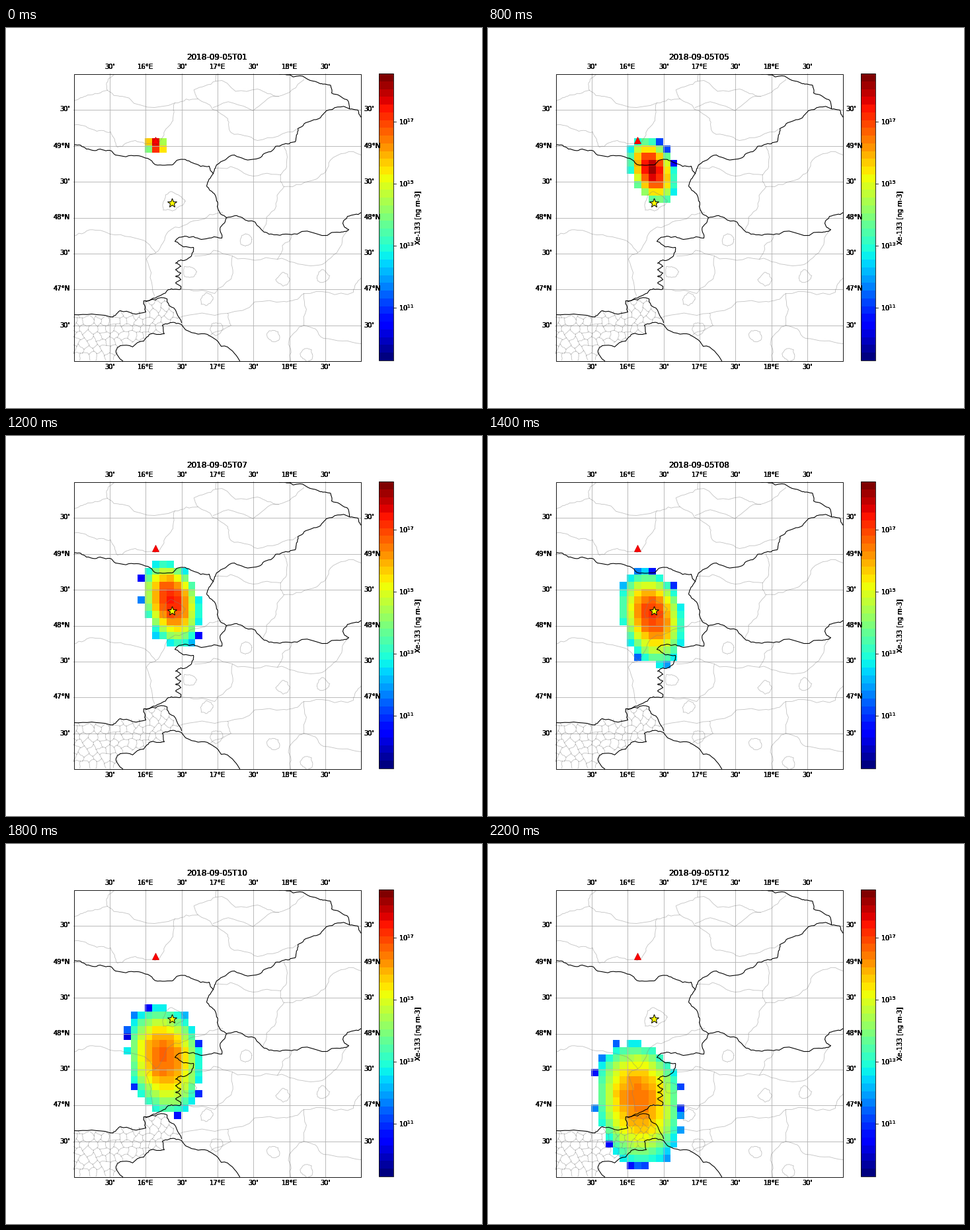
These frames come from a looping animation (720 px wide and 576 px high, 2400 ms). A matplotlib script:

```python
import numpy as np
import matplotlib.pyplot as plt
from matplotlib.animation import FuncAnimation
from matplotlib.patches import Polygon, Rectangle

rng = np.random.default_rng(7)
LEFT, TOP, SIDE = 101.6, 69.12, 434.8
RIGHT, BOTTOM = LEFT + SIDE, TOP + SIDE
DEG = SIDE / 4                    # pixels per degree
CELL = DEG / 10
BANDS = 37                        # colour steps of the scale
RIM = 0.4                         # level at the nominal edge of the cloud
COLS, ROWS = np.arange(-7, 10), np.arange(-1, 29)


def plume(hour):
    """Level per cell: a cloud that drifts south, swings east and spreads."""
    s = hour - 1
    peak = 0.9 + 0.125 * np.cos(np.pi * s / 11)
    cx = 1 + 2.1 * np.sin(np.pi * s / 11)
    cy = -0.6 + 0.3 * s + 0.13 * s ** 2
    width = 1.5 + 0.37 * s
    height = 1.2 + 6.8 * (s / 11) ** 0.75
    shear = 0.3 - 0.022 * s

    i, j = np.meshgrid(COLS, ROWS)
    dy = j - cy
    v = dy / (height * np.where(dy < 0, 0.9, 1.12))
    r = np.hypot((i - cx - shear * dy) / width, v)
    level = peak - (peak - RIM) * r ** (1.6 + 0.05 * s)

    # a few thin, dark cells just outside the rim
    noise = np.random.default_rng(hour)
    thin = (r > 1.06) & (r < 1.17) & (noise.random(r.shape) < 0.3)
    level = np.where(thin, noise.uniform(0.1, 0.35, r.shape), level)
    level = np.clip(np.floor(level * BANDS), 0, BANDS - 1) / (BANDS - 1)
    return np.ma.array(level, mask=(r > 1.06) & ~thin)


fig = plt.figure(figsize=(10, 8), dpi=72, facecolor="white")
ax = fig.add_axes([0, 0, 1, 1])
ax.set(xlim=(0, 720), ylim=(576, 0))
ax.axis("off")


def pixel(v):
    return np.round(v) + 0.5


window = Rectangle((pixel(LEFT), pixel(TOP)), pixel(RIGHT) - pixel(LEFT),
                   pixel(BOTTOM) - pixel(TOP), fill=False, ec="black",
                   lw=0.9, zorder=6)
ax.add_patch(window)


def label(x, y, s, size=10, **kw):
    # stacked copies give the heavy edges of the lettering
    kw = {"ha": "center", "va": "center", **kw}
    return [ax.text(x, y, s, fontsize=size, family="DejaVu Sans", **kw)
            for _ in range(6)]


def rough(points, rounds=3):
    """Coastline-like polyline by midpoint displacement."""
    p = np.array(points, float) + 0.5
    for _ in range(rounds):
        d = np.diff(p, axis=0)
        push = np.clip(rng.normal(0, 0.09, (len(d), 1)), -0.15, 0.15)
        mid = (p[1:] + p[:-1]) / 2 + push * d[:, ::-1] * [-1, 1]
        out = np.empty((2 * len(p) - 1, 2))
        out[::2], out[1::2] = p, mid
        p = out
    return p


def path(points, color="black", lw=1.1, alpha=1, z=4, clip=window):
    line, = ax.plot(*rough(points).T, color=color, lw=lw, alpha=alpha, zorder=z,
                    solid_joinstyle="round")
    line.set_clip_path(clip)


def district(*points, clip=window):
    path(points, "gray", 0.9, 0.45, 3, clip)


def town(x, y, r):
    a = np.linspace(0, 2 * np.pi, 9)[:, None]
    k = rng.uniform(0.75, 1.15, a.shape)
    k[-1] = k[0]
    district(*([x, y] + r * k * np.hstack([np.cos(a), np.sin(a)])))


mesh = ax.pcolormesh(LEFT + DEG + CELL * np.append(COLS, COLS[-1] + 1),
                     TOP + DEG + CELL * np.append(ROWS, ROWS[-1] + 1),
                     plume(1), cmap="jet", vmin=0, vmax=1, zorder=1)

# graticule and its labels
for k in range(1, 8):
    x, y = pixel(LEFT + k * DEG / 2), pixel(TOP + k * DEG / 2)
    ax.plot([x, x], [TOP, BOTTOM], color="#b4b4b4", lw=0.9, zorder=2)
    ax.plot([LEFT, RIGHT], [y, y], color="#b4b4b4", lw=0.9, zorder=2)
    lon = "30'" if k % 2 else f"{15 + k // 2}°E"
    lat = "30'" if k % 2 else f"{50 - k // 2}°N"
    label(x, 58.5, lon)
    label(x, 514, lon)
    label(97, y, lat, ha="right")
    label(541.5, y, lat, ha="left")

# national borders, all hung on a few junctions
north, west_end, bend = (519, 122), (313, 220), (333, 287)
alps = [(264, 395), (245, 396), (222, 409), (208, 413), (211, 430), (172, 428),
        (156, 437), (102, 434)]
mur = [(208, 413), (243, 410), (246, 420), (265, 446)]
sava = [(176, 504), (166, 488), (172, 481), (208, 474), (216, 464), (239, 463),
        (236, 450), (250, 446), (265, 449), (300, 463), (325, 482), (353, 504)]
zigzag = [(260 + 4 * (-1) ** n, y) for n, y in enumerate(range(351, 396, 5))]

path([(404, 69), (444, 72), (475, 84), (490, 86), (492, 98), (515, 108), north])
path([(537, 135), (532, 124), north, (484, 125), (462, 140), (441, 152),
      (437, 172), (418, 176), (400, 187), (378, 198), (345, 192), (318, 207),
      west_end])
path([(102, 177), (121, 183), (145, 184), (165, 192), (197, 193), (222, 204),
      (251, 207), (258, 200), (282, 204), (307, 209), west_end])
path([west_end, (303, 239), (314, 250), (320, 273), bend, (325, 300), (326, 318),
      (295, 320), (270, 315), (255, 323), (283, 332), (280, 345)] + zigzag + alps)
path([bend, (357, 287), (390, 309), (405, 313), (440, 312), (500, 309),
      (518, 305), (509, 296), (516, 285), (537, 279)])
path(mur)
path(sava)

# districts
district((102, 111), (123, 101), (153, 94), (155, 76), (163, 70))
district((153, 94), (175, 103), (255, 113), (252, 140), (240, 155), (225, 176),
         (195, 170), (168, 180), (158, 157), (130, 153), (102, 147))
district((255, 113), (290, 107), (284, 93), (317, 80), (318, 69))
district((290, 107), (335, 137), (340, 158), (380, 170), (440, 152))
district((317, 80), (380, 92), (412, 103), (450, 78))
district((313, 120), (373, 125), (412, 103))
district((316, 212), (360, 220), (415, 222), (420, 240), (408, 270), (388, 307))
district((420, 240), (470, 228), (490, 200), (537, 192))
district((420, 178), (425, 195), (415, 222))
district((102, 315), (135, 306), (195, 318), (226, 340), (212, 350), (224, 405))
district((226, 340), (245, 308), (290, 291), (327, 279))
district((285, 345), (342, 345), (340, 380), (315, 402), (264, 395))
district((342, 345), (410, 350), (432, 313))
district((410, 350), (460, 360), (500, 340), (515, 305))
district((258, 440), (335, 432), (420, 414), (450, 402), (525, 400), (537, 378))
district((335, 432), (340, 450), (305, 467))
district((450, 402), (450, 450), (480, 470), (537, 478))
district((450, 450), (428, 470), (430, 504))
town(251, 262, 17)
for x, y in [(277, 369), (418, 381), (478, 375), (302, 411), (405, 466),
             (455, 494), (362, 320), (317, 455)]:
    town(x, y, 10)

# dense municipalities: a jittered honeycomb cut to one country
region = Polygon(alps[:2:-1] + mur[1:] + sava[8::-1] + [(102, 504)],
                 fc="none", ec="none")
ax.add_patch(region)
row, col = np.mgrid[:10, :26]
tilt = np.where((row + col) % 2, -2, 2)
comb = np.dstack([98 + 6.5 * col, 405 + 11 * row + tilt])
comb = comb + rng.uniform(-2.7, 2.7, comb.shape)
for r, c in np.ndindex(9, 25):
    district(comb[r, c], comb[r, c + 1], clip=region)
    if (r + c) % 2 == 0:
        district(comb[r, c], comb[r + 1, c], clip=region)

# release point and station
ax.plot(226.2, 169.5, "^", ms=10, mfc="red", mec="#d00000", mew=0.8, zorder=5)
ax.plot(251.3, 264.5, "*", ms=14, mfc="yellow", mec="black", mew=1, zorder=5)

# colour bar
bar_x, bar_w = 564.3, SIDE / 20
ax.pcolormesh([bar_x, bar_x + bar_w], np.linspace(BOTTOM, TOP, BANDS + 1),
              np.linspace(0, 1, BANDS)[:, None], cmap="jet", vmin=0, vmax=1)
ax.add_patch(Rectangle((bar_x, TOP), bar_w, SIDE, fill=False, ec="black", lw=0.8))
for power in range(11, 18, 2):
    y = 424 - (power - 11) * 46.95
    ax.plot([bar_x + bar_w, bar_x + bar_w + 3.5], [y, y], color="black", lw=0.8)
    label(594, y, rf"$\mathdefault{{10^{{{power}}}}}$", ha="left")
label(624, 287, "Xe-133 [ng m-3]", rotation=90)

title = label(319.5, 44, "", 12)


def draw(n):
    hour = n + 1
    mesh.set_array(plume(hour))
    for t in title:
        t.set_text(f"2018-09-05T{hour:02d}")
    return [mesh, *title]


anim = FuncAnimation(fig, draw, frames=12, interval=200, repeat=True,
                     repeat_delay=0, blit=False)
plt.show()
```
